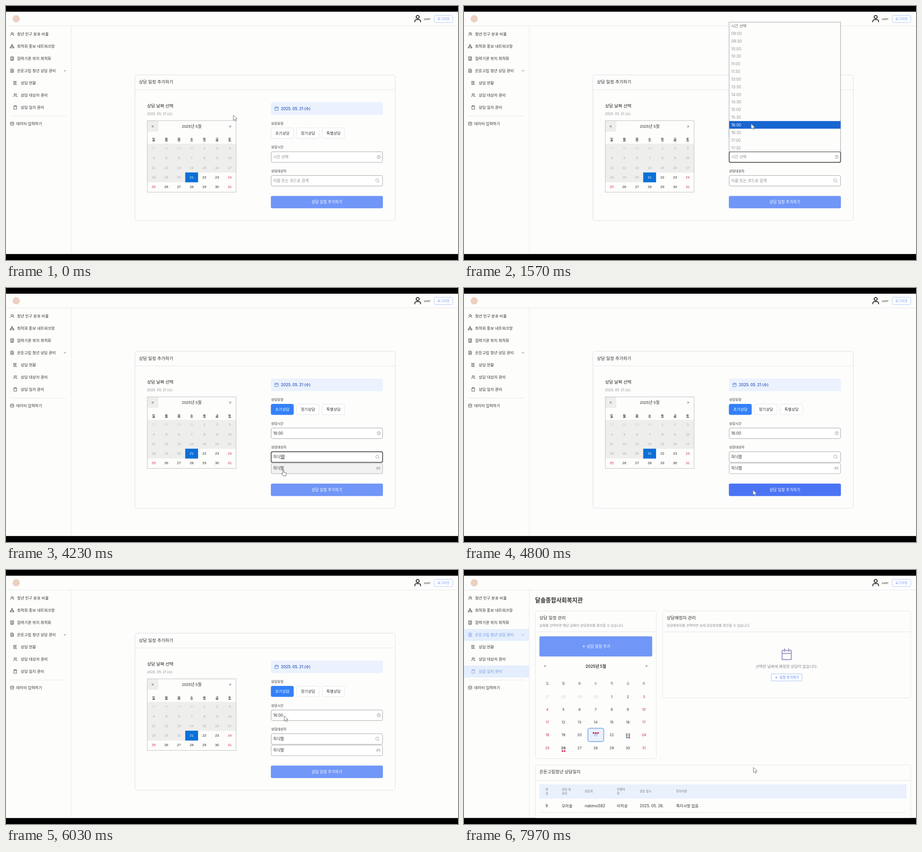
Animation of 998x561 px, one loop 8000 ms. Source, as an HTML page:

```html
<!DOCTYPE html>
<html lang="ko">
<head>
<meta charset="utf-8">
<style>
  html, body { margin: 0; width: 100%; height: 100%; overflow: hidden; background: #000; }
  svg { display: block; width: 100vw; height: 100vh; }
  text { font-family: Inter, 'Noto Sans CJK KR', 'Noto Sans CJK', sans-serif; white-space: pre; }
  text.arial { font-family: 'Liberation Sans', 'Noto Sans CJK KR', 'Noto Sans CJK', sans-serif; }
</style>
</head>
<body>
<svg viewBox="0 0 998 561"><g id="page"></g><g id="cursor"></g></svg>
<script>
const LOOP = 8000;
const CLIENT = '하늬별';
const INK = '#333', GRAY = '#8a8a8f', LINE = '#e6e6ea', PAPER = '#fdfdfc';
const BLUE = '#3480f7', SOFT = '#7096f7', RED = '#c42b35';

// Event times in ms
const AT = {
  type: 620, openTimes: 1150, pickTime: 1800, focusSearch: 2700, list: 3720,
  blur: 4700, alert: 4900, dismiss: 5760, pickClient: 6300, journal: 7270
};
const TYPING = [[3200, 'ㅎ'], [3340, '하'], [3440, '한'], [3520, '하늬'], [3600, '하늽'], [3680, '하늬벼'], [3760, CLIENT]];
const PATH = [
  [0, 502, 241], [120, 502, 241], [520, 608, 281], [720, 608, 283], [1080, 640, 332], [1200, 640, 332],
  [1540, 634, 260], [1860, 634, 261], [2520, 611, 388], [2700, 610, 398], [3850, 610, 398], [4180, 612, 402],
  [4450, 612, 402], [4760, 638, 446], [4980, 638, 446], [5560, 625, 87], [5780, 625, 87], [6150, 611, 398],
  [6350, 611, 398], [6720, 645, 436], [7400, 645, 436], [7800, 639, 436], [8000, 639, 436]
];
const TIMES = ['시간 선택', ...[9, 10, 11, 13, 14, 15, 16, 17].flatMap(h =>
  ['00', '30'].map(m => String(h).padStart(2, '0') + ':' + m))];
const TIME_STEP = 16.84;

// y is the vertical centre of the line
const text = (x, y, str, size, fill = INK, weight = 400, anchor = 'start', extra = '') =>
  `<text x="${x}" y="${y + size * .36}" font-size="${size}" fill="${fill}" font-weight="${weight}" text-anchor="${anchor}" ${extra}>${str}</text>`;
const mid = (x, y, str, size, fill, weight, extra) => text(x, y, str, size, fill, weight, 'middle', extra);
const rect = (x, y, w, h, fill, stroke = 'none', r = 0, sw = 1) =>
  `<rect x="${x}" y="${y}" width="${w}" height="${h}" rx="${r}" fill="${fill}" stroke="${stroke}" stroke-width="${sw}"/>`;
const line = (x1, y1, x2, y2, stroke = LINE, w = 1) =>
  `<path d="M${x1} ${y1}L${x2} ${y2}" stroke="${stroke}" stroke-width="${w}"/>`;
const dot = (x, y, r, fill) => `<circle cx="${x}" cy="${y}" r="${r}" fill="${fill}"/>`;
const icon = (x, y, size, name, color = '#444', w = 2) =>
  `<path transform="translate(${x - size / 2} ${y - size / 2}) scale(${size / 24})" d="${ICONS[name]}" fill="none" stroke="${color}" stroke-width="${w}" stroke-linecap="round" stroke-linejoin="round"/>`;

const ICONS = {
  user: 'M12 2a4.8 4.8 0 1 1 0 9.6a4.8 4.8 0 1 1 0-9.6M3 22v-2a5 5 0 0 1 5-5h8a5 5 0 0 1 5 5v2',
  person: 'M11 3a5 5 0 1 1 0 10a5 5 0 1 1 0-10M3 21a8 8 0 0 1 14-5M18 4a5 5 0 0 1 0 9q3 3 4 8',
  network: 'M9 2h6v6H9zM2 16h6v6H2zM16 16h6v6h-6zM5 16v-4h14v4M12 8v4',
  building: 'M4 2h16v20H4zM9 22v-4h6v4M8 6h1M12 6h1M16 6h1M8 10h1M12 10h1M16 10h1M8 14h1M12 14h1M16 14h1',
  file: 'M14 2H4v20h16V8zV8h6M8 13h8M8 17h8M8 9h2',
  chart: 'M3 3v18h18M3 3h16M8 8h8M8 12h11M8 16h5',
  users: 'M9 3a4 4 0 1 1 0 8a4 4 0 1 1 0-8M2 21v-2a4 4 0 0 1 4-4h6a4 4 0 0 1 4 4v2M16 3a4 4 0 0 1 0 8M22 21v-2a4 4 0 0 0-3-4',
  clip: 'M8 4H4v18h16V4h-4M8 2h8v4H8z',
  data: 'M3 5a9 3 0 1 1 18 0a9 3 0 1 1-18 0v14a9 3 0 0 0 18 0V5M3 12a9 3 0 0 0 18 0',
  calendar: 'M3 4h18v18H3zM3 10h18M8 1v5M16 1v5',
  clock: 'M12 2a10 10 0 1 1 0 20a10 10 0 1 1 0-20M12 6v6l4 2',
  search: 'M11 3a8 8 0 1 1 0 16a8 8 0 1 1 0-16M22 22l-5-5',
  down: 'M5 9l7 7l7-7', plus: 'M12 3v18M3 12h18', close: 'M5 5l14 14M19 5L5 19'
};
const CURSORS = {
  arrow: '<path d="M0 0V11.5L2.8 9L4.7 13L6.7 12L4.8 8.2H8.4Z" fill="#fff" stroke="#666" stroke-width=".9" stroke-linejoin="round"/>',
  beam: '<path d="M-3 -6H-1L0 -5L1 -6H3M0 -5V5M-3 6H-1L0 5L1 6H3" fill="none" stroke="#222" stroke-width="1.3"/>',
  hand: '<path d="M-1 0Q.3 -1.2 1.4 0V5L6 6Q7.4 6.4 7 8L6 13H0L-4 8.4Q-3.6 6.6 -1 8.4Z" fill="#fff" stroke="#555" stroke-width=".9" stroke-linejoin="round"/>'
};

const MENU = [
  [62, 'person', '청년 인구 분포 비율'], [89, 'network', '최적화 홍보 네트워크망'], [116, 'building', '협력기관 위치 최적화'],
  [143, 'file', '은둔고립 청년 상담 관리'], [170, 'chart', '상담 현황', 1], [197, 'users', '상담 대상자 관리', 1],
  [224, 'clip', '상담 일지 관리', 1]
];
const WEEK = [...'일월화수목금토'];
// Five weeks starting on 27 April 2025
const DAYS = Array.from({ length: 35 }, (_, i) => ({
  col: i % 7, row: Math.floor(i / 7), past: i < 4, day: i < 4 ? 27 + i : i - 3, weekend: i % 7 % 6 === 0
}));

function chrome(active) {
  let s = rect(0, 12.6, 998, 535.2, PAPER) + line(0, 44, 998, 44) + line(144, 44, 144, 548);
  s += dot(22.5, 28.3, 8, '#ecd0c0') + icon(909, 28, 17, 'user', '#222', 2.6);
  s += text(922.5, 28.5, 'user', 7) + rect(945.5, 20.5, 41, 16, '#fff', '#b5c9f6', 3) + mid(966, 28.5, '로그아웃', 7.4, '#6b93f2');
  for (const [y, name, label, sub] of MENU) {
    const on = active && (y === 143 || y === 224), color = on ? '#6f98ee' : INK;
    if (on) s += rect(0, y - 13, 143.5, 26.5, '#e4eefc');
    s += icon(sub ? 20.5 : 13.5, y, 9.5, name, color) + text(sub ? 32.5 : 24.5, y, label, 8.5, color);
    if (y === 143) s += icon(130, y, 7, 'down', color, 2.6);
  }
  return s + line(9, 243, 134, 243) + icon(13.5, 260, 9.5, 'data') + text(22.5, 260, '데이터 입력하기', 8.5, INK, 500);
}

function formCalendar() {
  const arial = 'class="arial"';
  let s = rect(312, 253, 24.3, 24.5, '#eeeeec') + rect(312, 304, 196, 64, '#eeeeec') + rect(312, 368, 84, 21.3, '#eeeeec');
  s += rect(395.7, 367.6, 28.4, 21.8, '#0b70d6') + rect(312, 253.2, 196, 158, 'none', '#c0c0c4');
  s += mid(324, 265.7, '&lt;', 9, INK, 400, arial) + mid(410, 265.7, '2025년 5월', 8.9, INK, 400, arial) + mid(495, 265.7, '&gt;', 9, INK, 400, arial);
  WEEK.forEach((d, i) => s += mid(326 + 28 * i, 295, d, 6.8, INK, 700, 'text-decoration="underline"'));
  for (const { col, row, past, day, weekend } of DAYS) {
    const color = past ? '#cfcfcf' : day < 21 ? '#aaa' : day === 21 ? '#fff' : weekend ? RED : '#222';
    s += mid(326 + 28 * col, 314.3 + 21.3 * row, day, 7.5, color, 400, arial);
  }
  return s;
}

function field(y, h, focused) {
  return focused ? rect(585.5, y, 246, h, '#fff', '#444', 3, 1.7) : rect(585.5, y, 246, h, '#fff', '#a6a6ac', 3);
}

function formPage(t, cy) {
  const listed = t >= AT.list && t < AT.pickClient, chosen = t >= AT.pickClient;
  const picked = t >= AT.pickTime, open = t >= AT.openTimes && !picked;
  const focused = t >= AT.focusSearch && t < AT.blur;
  const typed = TYPING.reduce((a, [at, str]) => t >= at ? str : a, '');
  const grow = listed ? 25.4 : chosen ? 4.8 : 0;
  const alertOpen = t >= AT.alert && t < AT.dismiss;

  let s = rect(284.5, 152.2, 575, 321.8 + grow, PAPER, '#dfdfe6', 5) + line(285, 184.8, 859, 184.8);
  s += text(293.5, 168, '상담 일정 추가하기', 9.6, INK, 500) + text(311.5, 220.3, '상담 날짜 선택', 9.6, '#222', 500);
  s += text(311.5, 238.5, '2025. 05. 21 (수)', 7.3, GRAY) + formCalendar();
  s += rect(585, 212.6, 247, 27.8, '#ebf2fd', 'none', 3) + icon(597.5, 226.5, 9.5, 'calendar', '#3f74e0');
  s += text(607, 226.5, '2025. 05. 21 (수)', 8.4, '#3d5fc0', 600);

  s += text(585.5, 259.3, '상담유형', 7.3);
  ['초기상담', '정기상담', '특별상담'].forEach((label, i) => {
    const on = !i && t >= AT.type, x = 585.3 + 56.5 * i;
    s += rect(x, 269.2, 49.5, 23.3, on ? BLUE : '#fff', on ? BLUE : LINE, 3) + mid(x + 24.9, 281, label, 8.5, on ? '#fff' : INK);
  });

  s += text(585.5, 311.8, '상담시간', 7.3) + field(321.9, 23.4, open) + icon(823, 333.5, 8.5, 'clock', '#777');
  s += text(590, 333.3, picked ? '16:00' : TIMES[0], 8.5, picked ? INK : GRAY);

  s += text(585.5, 364, '상담대상자', 7.3) + field(374.3, chosen ? 27.6 : 23.4, focused);
  if (chosen) {
    s += text(592, 388, CLIENT, 8.7, INK, 500) + text(620, 388, '#5', 7.6, GRAY) + icon(820, 388, 8, 'close', '#888');
  } else {
    s += icon(820, 385.5, 10, 'search', '#999');
    s += typed ? text(590, 385.7, typed, 8.6) : text(590, 385.7, '이름 또는 코드로 검색', 8.6, GRAY);
    if (focused) {
      const end = 590 + typed.length * 7.9;
      if (typed) s += line(end - 7.5, 390, end, 390, INK, .8);
      s += line(end + .5, 380.5, end + .5, 391, INK, .8);
    }
  }
  if (listed) {
    const hover = !alertOpen && cy > 386 && cy < 411;
    s += rect(585.5, 399.5, 246, 23.3, hover ? '#f1f1f1' : '#fff', '#b0b0b8', 3);
    s += text(590, 411, CLIENT, 8.6) + text(827, 411, '#5', 7.8, GRAY, 400, 'end');
  }
  const hot = alertOpen || (t > AT.list && cy > 422 && cy < 459);
  s += rect(584.8, 419.4 + grow, 247.4, 27.4, hot ? '#4b74f5' : SOFT, 'none', 3);
  s += mid(708.5, 433 + grow, '상담 일정 추가하기', 8.6, '#fff', 500);

  s = chrome(false) + `<g transform="translate(0 ${-grow / 2})">${s}</g>`;
  if (open) s += timeMenu(cy);
  if (alertOpen) s += alertBox();
  return s;
}

function timeMenu(cy) {
  const over = Math.floor((cy - 36) / TIME_STEP), active = over < TIMES.length ? over : 0;
  let s = rect(585.3, 35.7, 246.2, 286, PAPER, '#a2a2aa');
  TIMES.forEach((label, i) => {
    const y = 44 + i * TIME_STEP;
    if (i === active) s += rect(585.5, y - 8.8, 246, TIME_STEP, '#1765d0');
    s += text(590, y, label, 8.5, i === active ? '#fff' : i ? '#929297' : '#666');
  });
  return s;
}

function alertBox() {
  return rect(0, 12.6, 998, 535.2, 'rgba(0,0,0,.6)') +
    '<path d="M348 12.6H663V104Q663 112 655 112H356Q348 112 348 104Z" fill="#fafffe"/>' +
    text(362, 32.5, 'k12s309.p.ssafy.io 내용:', 10, INK) + text(362, 53, '상담 대상자를 선택해주세요.', 9.9, INK) +
    rect(601.5, 69.5, 49, 31, '#fff', '#237a79', 15.5, 1.8) + rect(604, 72, 44, 26, '#237a79', 'none', 13) +
    mid(626, 84.5, '확인', 9.5, '#fff');
}

function journalPage() {
  const card = (x, y, w, h, title, note) => rect(x + .5, y + .5, w, h, PAPER, LINE, 4) +
    text(x + 9.5, y + 16, title, 9.6, INK, 500) + (note ? text(x + 9.5, y + 32, note, 7.4, GRAY) : '');
  let s = chrome(true) + text(157, 66.5, '달솔종합사회복지관', 12.7, INK, 700);

  s += card(157, 90, 267, 326, '상담 일정 관리', '날짜를 선택하면 해당 날짜의 상담정보를 확인할 수 있습니다.') + line(157, 136.5, 424, 136.5);
  s += rect(166.5, 146.5, 249, 44.5, SOFT, 'none', 3) + icon(264.5, 168.5, 7.5, 'plus', '#fff', 2.4) + text(271, 168.5, '상담 일정 추가', 8.6, '#fff', 500);
  s += mid(179, 212.5, '&lt;', 8) + mid(291, 212.5, '2025년 5월', 8.7, INK, 600) + mid(403, 212.5, '&gt;', 8);
  const colX = i => 184 + 35.55 * i;
  WEEK.forEach((d, i) => s += mid(colX(i), 250, d, 7.2, '#666'));
  s += rect(273.5, 349.5, 35, 29.5, '#e9f1fd', '#6f9eea', 4, 1.5);
  for (const { col, row, past, day, weekend } of DAYS) {
    const color = past ? '#d0d0d4' : day === 21 ? '#5577c8' : weekend ? RED : INK;
    s += mid(colX(col), 280 + 28 * row + (row === 4 ? 1.3 : 0), day, 7.8, color, [23, 26].includes(day) ? 600 : 400);
  }
  for (const x of [286, 291, 296]) s += dot(x, 360, 2, '#cc3558');
  s += dot(359.8, 370, 1.9, '#3b8ea5') + dot(364.8, 370, 1.9, '#cc3558') + dot(217.5, 400, 1.9, '#cc3558') + dot(222.3, 400, 1.9, '#cc3558');

  s += card(438, 90, 548, 192, '상담예정자 관리', '상담예정자를 선택하면 상세 상담정보를 확인할 수 있습니다.') + line(438, 136.5, 986, 136.5);
  s += icon(712.5, 186.5, 27, 'calendar', '#a09fc8') + mid(712.5, 213, '선택한 날짜에 예정된 상담이 없습니다.', 8.5, '#85858c');
  s += rect(678.5, 229.5, 68, 15.5, '#fff', '#a5bdf5', 2.5) + icon(689.5, 237.3, 7, 'plus', '#4f80ee', 2.4) + text(696.5, 237.3, '일정 추가하기', 7.5, '#4f80ee', 500);

  s += card(157, 430, 829, 130, '은둔고립청년 상담일지') + line(157, 464.5, 986, 464.5) + rect(166.5, 473.5, 810.5, 31.5, '#eaf1fd');
  const columns = [
    [180, ['번', '호'], '9'], [216, ['상담 대', '상자'], '모아솔'], [266.5, ['상담자'], 'nabimo582'],
    [337.5, ['진행여', '부'], '미작성'], [388, ['상담 일시'], '2025. 05. 26.'], [468.5, ['특이사항'], '특이사항 없음']
  ];
  for (const [x, head, value] of columns) {
    head.forEach((h, i) => s += text(x, 489 + (i - (head.length - 1) / 2) * 9, h, 6.5, '#777'));
    s += text(x, 520.5, value, 8.5);
  }
  return s + line(167, 535.5, 977, 535.5) + rect(0, 547.8, 998, 14, '#000');
}

function cursorAt(t) {
  const i = Math.max(1, PATH.findIndex(p => p[0] > t));
  const [t0, x0, y0] = PATH[i - 1], [t1, x1, y1] = PATH[i];
  const u = (t - t0) / (t1 - t0), e = u * u * (3 - 2 * u);
  return [x0 + (x1 - x0) * e, y0 + (y1 - y0) * e];
}

function cursorKind(t, x, y) {
  if (t >= AT.alert && t < AT.dismiss || t >= AT.pickClient || x < 585) return 'arrow';
  if (t < AT.openTimes) return y > 269 && y < 293 ? 'hand' : 'arrow';
  if (t >= AT.list) return y > 386 && y < 411 ? 'hand' : 'arrow';
  return t > AT.pickTime && y > 374 && y < 400 ? 'beam' : 'arrow';
}

const page = document.getElementById('page'), cursor = document.getElementById('cursor');
let shown = '', shape = '';
function draw(now) {
  const t = now % LOOP, [x, y] = cursorAt(t);
  const next = t < AT.journal ? formPage(t, y) : journalPage();
  if (next !== shown) page.innerHTML = shown = next;
  const kind = cursorKind(t, x, y);
  if (kind !== shape) cursor.innerHTML = CURSORS[shape = kind];
  cursor.setAttribute('transform', `translate(${x} ${y})`);
  requestAnimationFrame(draw);
}
draw(0);
</script>
</body>
</html>
```
